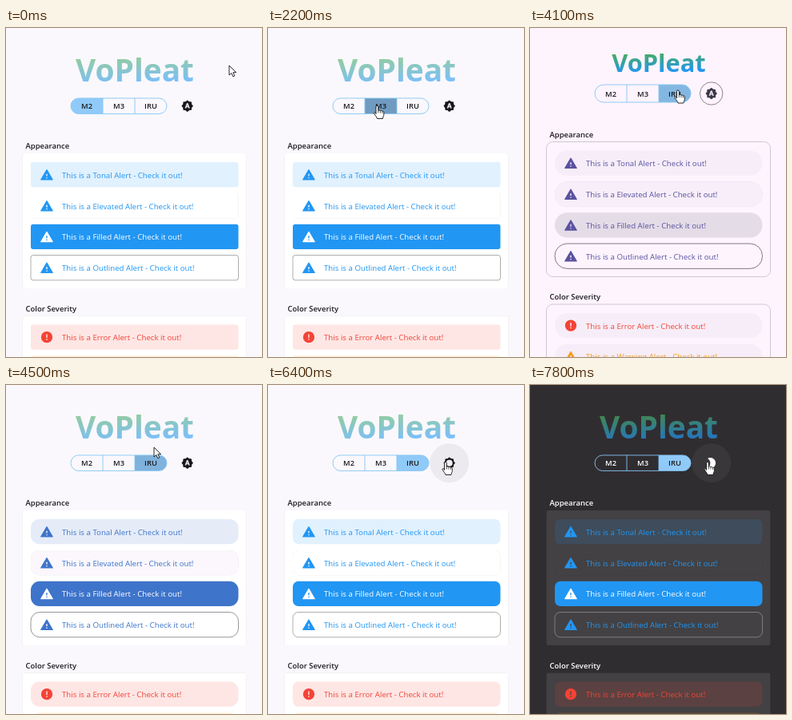
These frames come from a looping animation (320x412 px, 8 s). An HTML page:

```html
<!DOCTYPE html>
<html lang="en">
<head>
<meta charset="utf-8">
<title>Alert styles</title>
<style>
  html, body { margin: 0; width: 100%; height: 100%; overflow: hidden; }
  svg { display: block; width: 100%; height: 100%; }
  text { font-family: "Open Sans", "Noto Sans", sans-serif; }
  .title { font-weight: 700; text-anchor: middle; }
  .label { font-size: 9.5px; font-weight: 600; }
  .seg { font-size: 9.4px; font-weight: 600; text-anchor: middle; }
  .body { font-size: 9.7px; }
  .raised { filter: drop-shadow(0 .8px .5px rgba(0, 0, 0, var(--lift, .16))); }
</style>
</head>
<body>
<svg id="stage" viewBox="0 0 320 412" preserveAspectRatio="none">
  <defs>
    <linearGradient id="ink" x1="0" y1=".2" x2=".08" y2=".85">
      <stop offset="0" stop-color="#4caf50"/>
      <stop offset="1" stop-color="#2196f3"/>
    </linearGradient>
    <clipPath id="pill"><rect id="pillShape" x="81" width="120" rx="10"/></clipPath>
  </defs>
</svg>
<script>
const LOOP = 8000;
const stage = document.getElementById('stage');
const pillShape = document.getElementById('pillShape');

const set = (node, attrs) => {
  for (const k in attrs) node.setAttribute(k, attrs[k]);
  return node;
};
const el = (tag, attrs = {}, parent = stage, text) => {
  const node = document.createElementNS('http://www.w3.org/2000/svg', tag);
  if (text) node.textContent = text;
  return parent.appendChild(set(node, attrs));
};
const clamp = v => Math.max(0, Math.min(1, v));
const ramp = (t, a, b) => clamp((t - a) / (b - a));
const ease = p => p * p * (3 - 2 * p);
const lerp = (a, b, p) => a + (b - a) * p;
const bump = (t, a, peak, b) => ramp(t, a, peak) * (1 - ramp(t, peak, b));

// Colours blend with premultiplied alpha.
const parse = hex => [1, 3, 5, 7].map(i => parseInt(hex.slice(i, i + 2) || 'ff', 16));
const mix = (a, b, p) => {
  const [x, y] = [parse(a), parse(b)];
  const alpha = lerp(x[3], y[3], p);
  const rgb = [0, 1, 2].map(i => Math.round(lerp(x[i] * x[3], y[i] * y[3], p) / (alpha || 1)));
  return `rgba(${rgb},${(alpha / 255).toFixed(3)})`;
};

// Each list holds the values for M2, M3, the third style and dark mode.
// A fifth value is where the third style starts from, if not from M3.
const theme = {
  bg: ['#faf8fc', '#fef4fd', '#faf8fc', '#302d31'],
  card: ['#ffffff', '#fef4fd', '#ffffff', '#434143'],
  cardLine: ['#cac4d000', '#c9c2cf', '#cac4d000', '#cac4d000'],
  cardRound: [4, 8, 3, 3],
  cardLift: [.16, 0, .16, .16],
  text: ['#1d1b1f', '#1d1b20', '#1d1b1f', '#ffffff'],
  icon: ['#18171a', '#3c3947', '#18171a', '#ffffff'],
  iconLine: ['#6b667000', '#6b6670', '#6b667000', '#6b667000'],
  halo: ['#0000000e', '#0000000e', '#0000000e', '#ffffff0c'],
  titleAlpha: [.58, 1, .58, .7],
  titleSize: [38.8, 30.8, 38.8, 38.8],
  titleY: [67, 55, 67, 67],
  barY: [97.7, 82, 97.7, 97.7],
  barH: [19.5, 22, 19.5, 19.5],
  shift: [0, -14.5, 0, 0]
};
const BLUE = '#2196f3', PURPLE = '#5b52a0', WHITE = '#ffffff';
const same = v => [v, v, v, v];
const tint = (hex, start = hex) => [hex + '22', '#f6edf8', hex + '22', hex + '22', start + '22'];
const blueInk = [BLUE, PURPLE, BLUE, BLUE];
const round = [3, 15.4, 7, 7];

const specs = [
  { name: 'Tonal', y: 168, fill: tint(BLUE, PURPLE), ink: blueInk },
  { name: 'Elevated', y: 207, fill: [WHITE, '#f7eef9', WHITE, '#434143'], ink: blueInk, raised: true },
  { name: 'Filled', y: 245.7, fill: [BLUE, '#e4dce7', BLUE, BLUE, PURPLE], ink: [WHITE, PURPLE, WHITE, WHITE, WHITE] },
  { name: 'Outlined', y: 284.5, fill: same('#ffffff00'), ink: blueInk,
    line: ['#00000066', '#5f5a68', '#00000066', '#ffffff66'] },
  { name: 'Error', y: 371.5, fill: tint('#f44336'), ink: same('#f44336'), error: true },
  { name: 'Warning', y: 410.2, fill: tint('#ff9800'), ink: same('#f89c1c') }
];
const TRIANGLE = 'M1.6 21h20.8q1 0 .5-1L12.7 2.6q-.7-1-1.4 0L1.1 20q-.5 1 .5 1zM13 18h-2v-2h2zm0-4h-2v-4h2z';
const ROUND_MARK = 'M12 2a10 10 0 1 0 0 20a10 10 0 1 0 0-20zM13 17h-2v-2h2zm0-4h-2V7h2z';
const MOON = 'M10 2c-1.82 0-3.53.5-5 1.35C7.99 5.08 10 8.3 10 12s-2.01 6.92-5 8.65C6.47 21.5 8.18 22 10 22c5.52 0 10-4.48 10-10S15.52 2 10 2z';
const LETTER_A = 'M10.85 12.65h2.3L12 9zM14.3 16l-.7-2h-3.2l-.7 2H7.8L11 7h2l3.2 9z';

// Scene
const back = el('rect', { width: 320, height: 412 });
const title = el('text', { class: 'title', x: 161, fill: 'url(#ink)' }, stage, 'VoPleat');

const segs = ['M2', 'M3', 'IRU'].map((name, i) => {
  const box = { x: 81 + i * 40, width: 40, 'clip-path': 'url(#pill)' };
  return { x: 81 + i * 40, fill: el('rect', { ...box, fill: '#90caf9' }), shade: el('rect', box),
    text: el('text', { class: 'seg', x: 101 + i * 40 }, stage, name) };
});
const outline = { fill: 'none', stroke: '#84c6f3', 'stroke-width': .9 };
const pillLine = el('rect', { x: 81, width: 120, ...outline });
const dividers = [121, 161].map(x => el('line', { x1: x, x2: x, ...outline }));

const button = el('g');
const halo = el('circle', {}, button);
const flash = el('circle', { r: 24.5, fill: '#fff' }, button);
const ring = el('circle', { r: 14.2, fill: 'none', 'stroke-width': .8 }, button);
const glyph = el('g', { transform: 'scale(.667) translate(-12 -12)' }, button);
const badge = el('g', {}, glyph);
for (const a of [0, 45])
  el('rect', { x: 4, y: 4, width: 16, height: 16, rx: 1.8, transform: `rotate(${a} 12 12)` }, badge);
const letter = el('path', { d: LETTER_A, 'fill-rule': 'evenodd', 'stroke-width': .5 }, glyph);
const hole = el('circle', { cx: 12, cy: 12, r: 6, fill: '#f0eff1' }, glyph);
const moon = el('path', { d: MOON }, glyph);

const list = el('g');
const cards = [[157, 169], [360.5, 300]].map(([y, height]) =>
  el('rect', { class: 'raised', x: 20.5, y, width: 280, height, 'stroke-width': .9 }, list));
const labels = [['Appearance', 151.1], ['Color Severity', 354.6]].map(([name, y]) =>
  el('text', { class: 'label', x: 24.5, y }, list, name));
const alerts = specs.map(s => {
  const g = el('g', { transform: `translate(0 ${s.y})` }, list);
  return { ...s,
    box: el('rect', { class: s.raised ? 'raised' : '', x: 31, width: 259.5, height: 31.3, 'stroke-width': .8 }, g),
    mark: el('path', { d: s.error ? ROUND_MARK : TRIANGLE, 'fill-rule': 'evenodd',
      transform: `translate(42.4 ${s.error ? 7.1 : 7.5}) scale(.715)` }, g),
    text: el('text', { class: 'body', x: 70, y: 19.6 }, g, `This is a ${s.name} Alert - Check it out!`) };
});

const pointer = el('g', { fill: '#fff', stroke: '#111', 'stroke-width': .9, 'stroke-linejoin': 'round' });
const arrow = el('path', { d: 'M0 0V12L2.8 9.5L4.8 13.8L6.8 12.9L4.9 8.7H8.6Z' }, pointer);
const hand = el('g', {}, pointer);
el('path', { d: 'M-1.5 10V1.3a1.4 1.4 0 0 1 2.8 0V6c.4-.9 2.4-.7 2.6.4c.6-.8 2.3-.5 2.5.6c.7-.5 1.9-.1 1.9 1v3.2c0 1.5-1.2 2.5-1.4 4.8H0C-.5 14-2.5 12-3.8 9.6c-.7-1.4.9-2 1.6-1z' }, hand);
el('path', { d: 'M1.3 6v3M3.9 6.6v2.6M6.4 7.2v2.2', fill: 'none', 'stroke-width': .7 }, hand);

// Motion
const switches = [2250, 4280, 7170];
const picks = [[2050, 1], [4050, 2]];
const route = [[100, 279, 47], [900, 218, 68], [1500, 136.5, 97.5], [2950, 136.5, 97.5],
  [3800, 185, 78], [5150, 185, 78], [6000, 222, 96.5]];

function pointerAt(t) {
  let i = 0;
  while (i < route.length - 2 && t > route[i + 1][0]) i++;
  const [a, b] = [route[i], route[i + 1]];
  const p = ease(ramp(t, a[0], b[0]));
  return [lerp(a[1], b[1], p), lerp(a[2], b[2], p)];
}

function draw(t) {
  const step = switches.filter(s => t >= s).length;
  const start = step ? switches[step - 1] : -LOOP;
  const main = ramp(t, start, start + 200);
  const late = ease(ramp(t, start + 70, start + 370));
  const before = v => step === 2 && v[4] || v[Math.max(0, step - 1)];
  const num = (v, p = main) => lerp(before(v), v[step], p);
  const col = (v, p = main) => mix(before(v), v[step], p);

  set(back, { fill: col(theme.bg) });
  set(title, { y: num(theme.titleY), 'font-size': num(theme.titleSize), 'fill-opacity': num(theme.titleAlpha) });

  const [px, py] = pointerAt(t);
  const mid = num(theme.barY), height = num(theme.barH), top = mid - height / 2;
  const onBar = px > 81 && px < 201 && Math.abs(py - mid) < height / 2;
  const onButton = Math.hypot(px - 226.5, py - mid) < 15;
  const segText = col(theme.text, late);
  const picked = picks.filter(p => t >= p[0]).length;

  set(pillShape, { y: top, height, rx: height / 2 });
  set(pillLine, { y: top, height, rx: height / 2 });
  dividers.forEach(d => set(d, { y1: top, y2: top + height }));
  segs.forEach((s, i) => {
    const hover = onBar && px >= s.x && px < s.x + 40 ? .07 : 0;
    const press = i ? .24 * bump(t, picks[i - 1][0], picks[i - 1][0] + 130, picks[i - 1][0] + 750) : 0;
    set(s.fill, { y: top, height, opacity: +(i === picked) });
    set(s.shade, { y: top, height, opacity: Math.max(hover, press) });
    set(s.text, { y: mid + 3.5, fill: i === picked ? '#1d1b1f' : segText });
  });

  const icon = col(theme.icon);
  const mode = t < 6150 ? 0 : t < 7100 ? 1 : 2;
  const grow = ramp(t, 6050, 6400);
  set(button, { transform: `translate(226.7 ${mid})` });
  set(halo, { r: lerp(12, 24.5, ease(grow)), fill: col(theme.halo), opacity: grow });
  set(flash, { opacity: .2 * bump(t, 6950, 7300, 7750) });
  set(ring, { stroke: col(theme.iconLine) });
  set(badge, { fill: icon, opacity: +(mode < 2) });
  set(letter, { fill: col(theme.bg), stroke: col(theme.bg), opacity: +(mode === 0) });
  set(hole, { opacity: +(mode === 1) });
  set(moon, { fill: icon, opacity: +(mode === 2) });

  set(list, { transform: `translate(0 ${num(theme.shift)})` });
  cards.forEach(c => {
    set(c, { fill: col(theme.card), stroke: col(theme.cardLine), rx: num(theme.cardRound) });
    c.style.setProperty('--lift', num(theme.cardLift));
  });
  labels.forEach(l => set(l, { fill: col(theme.text) }));
  alerts.forEach(a => {
    const ink = col(a.ink, late);
    set(a.box, { fill: col(a.fill, late), rx: num(round, late), stroke: a.line ? col(a.line, late) : 'none' });
    set(a.mark, { fill: ink });
    set(a.text, { fill: ink });
  });

  const isHand = onBar || onButton;
  set(pointer, { transform: `translate(${px} ${py})` });
  set(arrow, { opacity: +!isHand });
  set(hand, { opacity: +isHand });
}

const begin = performance.now();
function tick() {
  draw((performance.now() - begin) % LOOP);
  requestAnimationFrame(tick);
}
tick();
</script>
</body>
</html>
```
